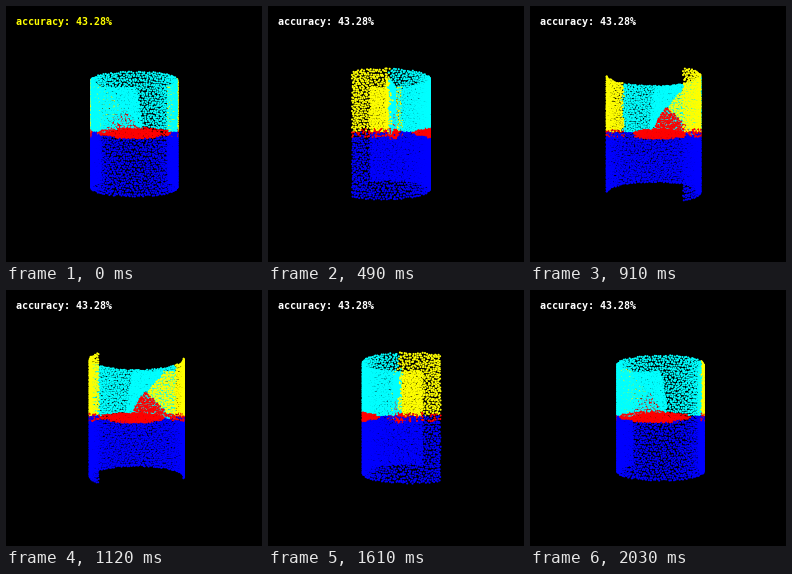
Write a matplotlib script that moves like this. It is 256 by 256 pixels and loops after 2.1 s.

```python
import numpy as np
import matplotlib.pyplot as plt
from matplotlib.animation import FuncAnimation

SIZE, DPI = 256, 100
FRAMES, STEP_MS = 30, 70
RADIUS, HALF, CAMERA = 44.4, 54.8, 256.0   # wall radius, half height, eye distance
AXIS_Z = -RADIUS / 4                       # wall axis behind the pivot
SPREAD = np.radians(122)                   # wall covers -SPREAD..SPREAD
DOT = 2.1

BLUE, CYAN, YELLOW, RED = range(4)
COLORS = np.array([(0, 0, 1), (0, 1, 1), (1, 1, 0), (1, 0, 0)], float)
rng = np.random.default_rng(7)


def px(n):
    return n * 72 / DPI


def scatter_grid(x0, x1, y0, y1, gap):
    """Evenly spread random points: one per cell of a staggered grid."""
    nx, ny = int((x1 - x0) / gap), int((y1 - y0) / gap)
    i, j = np.meshgrid(np.arange(nx), np.arange(ny))
    i = i + 0.5 * (j % 2) + rng.uniform(-0.1, 0.6, i.shape)
    j = j + rng.uniform(0.1, 0.9, j.shape)
    return (x0 + (x1 - x0) * i / nx).ravel(), (y0 + (y1 - y0) * j / ny).ravel()


def wall():
    arc, v = scatter_grid(-SPREAD * RADIUS, SPREAD * RADIUS, -HALF, HALF, 1.95)
    a = arc / RADIUS
    deg = np.degrees(a) + rng.normal(0, 1.5, a.size)
    label = np.where((deg < -76) | (deg > 73), YELLOW, CYAN)
    label[v < 1.8] = BLUE
    lens = np.abs(v - 1.2) < 5 * (1 - (deg / 56) ** 2)
    fringe = (np.abs(v - 0.8) < 3.6) & (np.abs(deg) > 68) & (rng.random(a.size) < 0.5)
    label[lens | fringe] = RED
    return RADIUS * np.sin(a), v, RADIUS * np.cos(a) + AXIS_Z, label


def sheet(z, back):
    """Inner partition standing on the middle level."""
    u, v = scatter_grid(-42, 26, -5, 47, 1.9)
    foot = np.abs(v) < 5 * np.sqrt(np.clip(1 - (u / 30) ** 2, 0, 1))
    keep = foot | ((v > 0) & (u < 8 - 7 * (v / 47) ** 2))
    u, v, foot = u[keep], v[keep], foot[keep]
    label = np.full(u.size, CYAN)
    peak = 27 - np.where(u < -10, 0.95 * (-10 - u), 1.5 * (u + 10))
    if back:
        label[(u < -8) & (v < 24 - 1.25 * (u + 11))] = YELLOW
        label[v < np.maximum(peak, 4)] = RED
    else:
        label[(v < peak) & (rng.random(u.size) < 0.35)] = RED
    label[foot] = RED
    return u, v, np.full(u.size, z), label


parts = [wall(), sheet(-1.5, False), sheet(-4.0, True)]
X, Y, Z, LABEL = (np.concatenate(p) for p in zip(*parts))

fig = plt.figure(figsize=(SIZE / DPI, SIZE / DPI), dpi=DPI, facecolor="black")
ax = fig.add_axes([0, 0, 1, 1])
ax.set(xlim=(0, SIZE), ylim=(SIZE, 0))
ax.axis("off")
cloud = ax.scatter(X, Y, s=px(DOT) ** 2, marker="o", linewidths=0, snap=False)
caption = ax.text(9.5, 19, "accuracy: 43.28%", family="DejaVu Sans Mono",
                  weight="bold", size=px(10), va="baseline")


def draw(i):
    turn = 2 * np.pi * i / FRAMES
    c, s = np.cos(turn), np.sin(turn)
    x, depth = X * c + Z * s, Z * c - X * s
    zoom = CAMERA / (CAMERA - depth)
    order = np.argsort(depth)
    points = np.column_stack([128.3 + x * zoom, 128 - Y * zoom])
    cloud.set_offsets(points[order])
    cloud.set_facecolor(COLORS[LABEL[order]])
    caption.set_color("yellow" if i == 0 else "white")
    return cloud, caption


anim = FuncAnimation(fig, draw, frames=FRAMES, interval=STEP_MS,
                     repeat=True, repeat_delay=0, blit=False)
plt.show()
```
